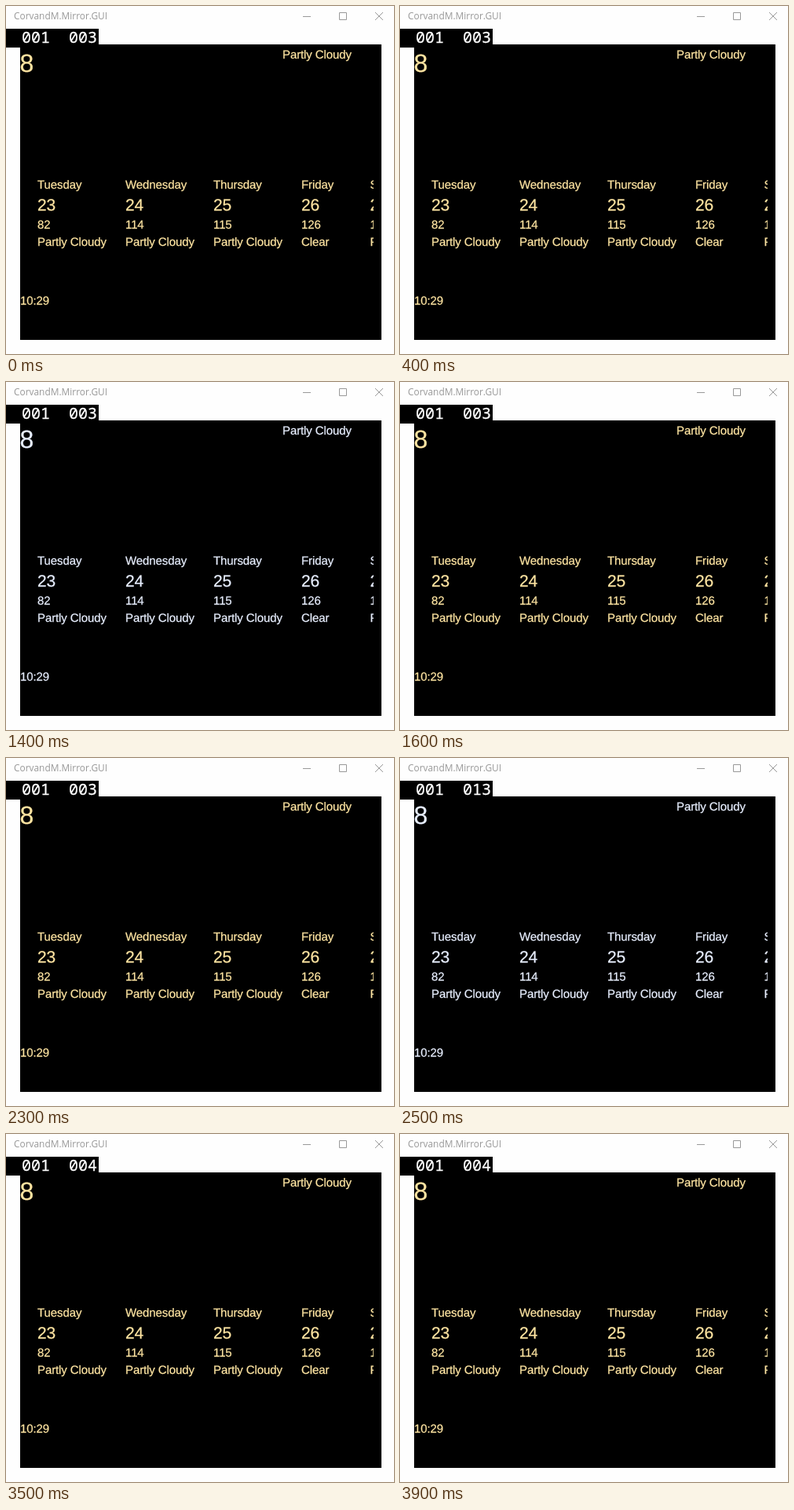
Animation of 494x444 px, one loop 4 s. Source, as an HTML page:

```html
<!DOCTYPE html>
<html lang="en">
<head>
<meta charset="utf-8">
<title>Mirror</title>
<style>
  html, body { margin: 0; width: 100%; height: 100%; overflow: hidden; background: #fefefe; }
  svg { display: block; width: 494px; height: 444px; }
  text { white-space: pre; }

  .title { font: 11.9px "Open Sans", "Noto Sans", sans-serif; fill: #999; }
  .buttons { fill: none; stroke: #999; }
  .counter {
    font: 20px "Noto Sans Mono", "DejaVu Sans Mono", monospace;
    fill: #fff;
    stroke: #fff;
    stroke-width: 0.3px;
  }

  .mirror {
    font: 15px "Liberation Sans", Arial, sans-serif;
    letter-spacing: -0.1px;
    text-rendering: geometricPrecision;
    stroke-width: 0.25px;
    animation: tint 4s -20ms step-end infinite;
  }
  .mirror text { fill: currentColor; stroke: currentColor; }
  .date { font-size: 21px; }
  .big { font-size: 32px; }

  .rate { animation: 4s -20ms step-end infinite; }
  .low { animation-name: low; }
  .peak { animation-name: peak; }
  .late { animation-name: late; }

  @keyframes tint {
    0%, 37.5%, 87.5%, 100% { color: #ffe5a2; }
    12.5%, 62.5% { color: #e8efff; }
  }
  @keyframes low {
    0% { visibility: visible; }
    62.5%, 100% { visibility: hidden; }
  }
  @keyframes peak {
    0%, 87.5%, 100% { visibility: hidden; }
    62.5% { visibility: visible; }
  }
  @keyframes late {
    0% { visibility: hidden; }
    87.5%, 100% { visibility: visible; }
  }
</style>
</head>
<body>
<svg viewBox="0 0 494 444">
  <defs>
    <clipPath id="view"><rect x="18" y="49" width="450" height="377"/></clipPath>
  </defs>

  <text class="title" x="10" y="17">CorvandM.Mirror.GUI</text>
  <g class="buttons">
    <path d="M378 13.5h10M424.5 8.5h9v9h-9z"/>
    <path d="M470 8l10 10M480 8l-10 10"/>
  </g>

  <path d="M0 29H118V53H0zM18 49H478V426H18z"/>

  <g class="counter">
    <text x="20" y="47">001</text>
    <text class="rate low" x="80" y="47">003</text>
    <text class="rate peak" x="80" y="47">013</text>
    <text class="rate late" x="80" y="47">004</text>
  </g>

  <g class="mirror" clip-path="url(#view)">
    <text class="big" x="17.5" y="83.5">8</text>
    <text x="352" y="67">Partly Cloudy</text>
    <g id="days"></g>
    <text x="18" y="381">10:29</text>
  </g>
</svg>
<script>
  const days = [
    [40, "Tuesday", 23, 82, "Partly Cloudy"],
    [152, "Wednesday", 24, 114, "Partly Cloudy"],
    [264, "Thursday", 25, 115, "Partly Cloudy"],
    [376, "Friday", 26, 126, "Clear"],
    [463.5, "Saturday", 27, 120, "Partly Cloudy"]
  ];
  const baselines = [233, 261, 284, 306];
  const root = document.getElementById("days");

  for (const [x, ...lines] of days) {
    lines.forEach((line, i) => {
      const text = document.createElementNS("http://www.w3.org/2000/svg", "text");
      text.setAttribute("x", x);
      text.setAttribute("y", baselines[i]);
      if (i === 1) text.setAttribute("class", "date");
      text.textContent = line;
      root.append(text);
    });
  }
</script>
</body>
</html>
```
